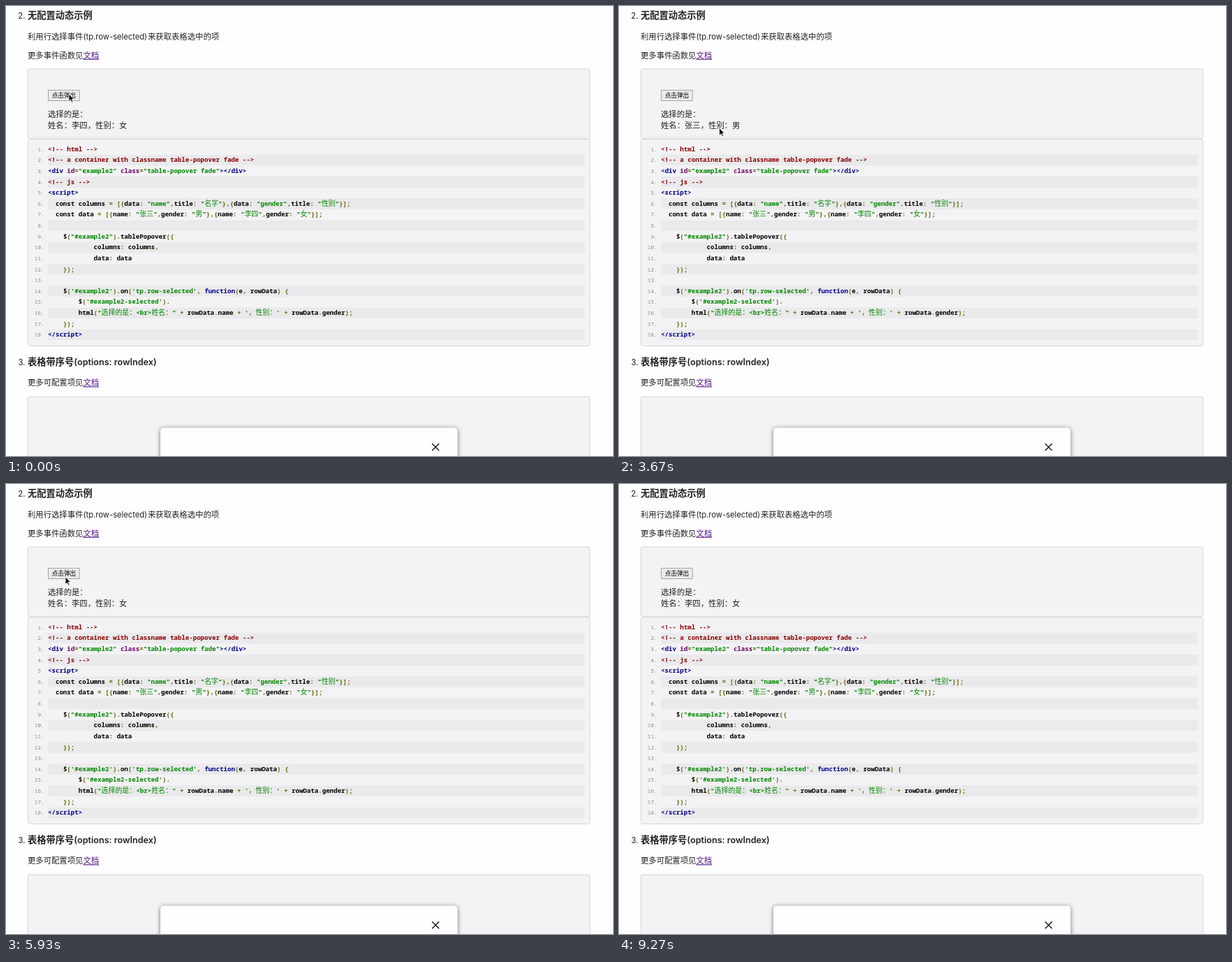
These frames come from a looping animation (869x644 px, 9.34 s). An HTML page:

```html
<!DOCTYPE html>
<html lang="zh-CN">
<head>
<meta charset="utf-8">
<title>Table popover</title>
<style>
html, body { margin: 0; width: 100%; height: 100%; overflow: hidden; background: #fefdff; }
svg { display: block; font: 11.35px Inter, "Noto Sans CJK SC", "Noto Sans CJK", sans-serif; fill: #222; }
text { white-space: pre; }
h, .title { font-size: 13.27px; font-weight: 600; }
.link { fill: #551a8b; text-decoration: underline; }
.panel { fill: #f3f2f4; stroke: #d6d5d8; }
.card { fill: #fefdff; filter: drop-shadow(0 1.5px 3px rgba(0, 0, 0, .55)); }
.close { stroke: #222; stroke-width: 1.6; }
.code { font: 600 9.12px "Noto Sans Mono", "Noto Sans CJK SC", "Noto Sans CJK", monospace; fill: #000; }
.cjk { font-size: 9.95px; font-weight: 500; }
.num { font-size: 7.6px; font-weight: 400; fill: #8a8a8a; text-anchor: end; }
.com { fill: #800; } .str { fill: #080; } .tag, .kwd { fill: #008; } .atn { fill: #606; } .pun { fill: #660; }
.cells { text-anchor: middle; font-size: 10px; }
.head { font-size: 11px; font-weight: 700; }
.cursor { stroke-width: .8; stroke-linejoin: round; }
</style>
</head>
<body>
<svg width="869" height="644" viewBox="0 0 869 644">
  <defs><path id="cross" class="close" d="M-5-5 5 5M5-5-5 5"/></defs>

  <text x="27.5" y="17.8" text-anchor="end">2.</text>
  <text x="31" y="18" class="title">无配置动态示例</text>
  <text y="47.5"><tspan x="31">利用行选择事件</tspan><tspan x="110.5" font-size="11.2">(tp.row-selected)</tspan><tspan x="203">来获取表格选中的项</tspan></text>
  <text x="31" y="74.7">更多事件函数见<tspan class="link">文档</tspan></text>

  <rect class="panel" x="31.5" y="90" width="804.5" height="100" rx="3"/>
  <rect id="button" x="60.5" y="120.5" width="44.7" height="15" stroke="#a5a4a6"/>
  <text x="65.7" y="131" font-size="8.6" fill="#000">点击弹出</text>
  <text x="60" y="159.2">选择的是：</text>
  <text x="60" y="174.7" id="chosen"></text>

  <rect class="panel" x="31.5" y="190.5" width="804.5" height="296" rx="3"/>
  <g class="code" id="code"></g>

  <text x="27.5" y="514.3" text-anchor="end">3.</text>
  <text x="31" y="514.3" class="title">表格带序号<tspan font-size="12.6">(options: rowIndex)</tspan></text>
  <text x="31" y="543.3">更多可配置项见<tspan class="link">文档</tspan></text>
  <rect class="panel" x="31.5" y="559" width="804.5" height="100" rx="3"/>
  <rect class="card" x="221" y="603.5" width="425.5" height="194" rx="5"/>
  <use href="#cross" x="615" y="631.3"/>

  <g id="modal">
    <rect class="card" x="207" y="223" width="425.5" height="194" rx="5"/>
    <use href="#cross" x="601" y="250.5"/>
    <path d="M217 270.5H621" stroke="#e2e1e4"/>
    <rect x="232" y="285.5" width="375.5" height="31" fill="#f3f5f8"/>
    <path d="M232 285.5H607.5" stroke="#9aa3a8"/>
    <path d="M232 316.5H607.5" stroke="#c3cacf"/>
    <path d="M232 346H607.5" stroke="#dcdbde"/>
    <g class="cells">
      <text class="head" x="326" y="305">名字</text><text class="head" x="513.5" y="305">性别</text>
      <text id="row0" x="326" y="334.8">张三</text><text x="513.5" y="334.8">男</text>
      <text id="row1" x="326" y="363.8">李四</text><text x="513.5" y="363.8">女</text>
    </g>
  </g>

  <g class="cursor" id="cursor">
    <path id="arrow" d="M0 0V10.5L2.4 8.3 4.1 12 5.8 11.2 4.2 7.7 7.3 7.5Z" fill="#000" stroke="#fff"/>
    <path id="hand" d="M-1 1Q0-.6 1 1V4.6Q2.2 3.6 3 4.8 4.2 4 5 5.2 6.8 4.8 7 6.4V9L6 12H.4L-3 8Q-3.2 6.4-1 7.4ZM1 4.6V7M3 4.8V7M5 5.2V7" fill="#fff" stroke="#000"/>
  </g>
</svg>
<script>
const $ = id => document.getElementById(id);

const source = `<\!-- html -->
<\!-- a container with classname table-popover fade -->
<div id="example2" class="table-popover fade"></div>
<\!-- js -->
<\script>
  const columns = [{data: "name",title: "名字"},{data: "gender",title: "性别"}];
  const data = [{name: "张三",gender: "男"},{name: "李四",gender: "女"}];

    $("#example2").tablePopover({
            columns: columns,
            data: data
    });

    $('#example2').on('tp.row-selected', function(e, rowData) {
        $('#example2-selected').
        html("选择的是：<br>姓名：" + rowData.name + '，性别：' + rowData.gender);
    });
<\/script>`;

const token = /(?<com><!--.*?-->)|(?<str>"[^"]*"|'[^']*')|(?<tag><\/?\w+|>)|(?<atn>\w+(?==))|(?<kwd>function)|(?<pun>[^\w\s$])|[\w$]+|\s+/g;
const escapeText = s => s.replace(/&/g, "&amp;").replace(/</g, "&lt;")
  .replace(/[\u3000-\uffef]+/g, run => `<tspan class="cjk">${run}</tspan>`);

function highlight(line) {
  return [...line.matchAll(token)].map(match => {
    const kind = Object.keys(match.groups).find(name => match.groups[name]);
    return `<tspan class="${kind || "pln"}">${escapeText(match[0])}</tspan>`;
  }).join("");
}

$("code").innerHTML = source.split("\n").map((line, i) => {
  const y = 207.7 + i * 15.62;
  const stripe = i % 2 ? `<rect x="60" y="${y - 10.5}" width="768.5" height="15.6" fill="#eae9eb"/>` : "";
  return `${stripe}<text class="num" x="54.5" y="${y}">${i + 1}.</text><text x="60" y="${y}">${highlight(line)}</text>`;
}).join("");

const LOOP = 9340, FADE = 150, STEP = 1000 / 15;
const visits = [[1750, 3250], [4150, 5250], [6400, 7500]]; // modal opens, closes
const track = [ // time, x, y of the pointer tip
  [0, 90, 126], [500, 90, 126], [1200, 79, 127], [1800, 79, 127],
  [2500, 330, 337], [3250, 330, 337], [3850, 90, 128], [4180, 90, 128],
  [4330, 100, 134], [4900, 328, 362], [5250, 328, 362], [5930, 85, 133],
  [6150, 83, 128], [6420, 83, 128], [6800, 501, 218], [7150, 599, 249],
  [7550, 599, 249], [8000, 590, 254], [8600, 330, 300]
];

const clamp = v => Math.max(0, Math.min(1, v));

function pointerAt(t) {
  const i = track.findIndex(key => key[0] > t);
  if (i < 0) return null;
  const [t0, x0, y0] = track[i - 1], [t1, x1, y1] = track[i];
  const p = (t - t0) / (t1 - t0), k = p * p * (3 - 2 * p);
  return [x0 + (x1 - x0) * k, y0 + (y1 - y0) * k];
}

function draw(t) {
  const opacity = Math.max(...visits.map(([open, close]) =>
    Math.min(clamp((t - open) / FADE), clamp(1 - (t - close) / FADE))));
  $("modal").setAttribute("opacity", opacity);

  const pressed = visits.some(([open]) => t >= open - 110 && t < open);
  $("button").setAttribute("fill", pressed ? "#b2b1b3" : "#ebeaec");
  $("chosen").textContent = t >= 3250 && t < 5250 ? "姓名：张三，性别：男" : "姓名：李四，性别：女";

  const tip = pointerAt(t);
  $("cursor").style.display = tip ? "" : "none";
  const [x, y] = tip || [0, 0];
  const over = (left, top, right, bottom) =>
    opacity > 0 && x > left && x < right && y > top && y < bottom;
  const rows = [over(314, 323, 338, 341), over(314, 352, 338, 370)];
  rows.forEach((hot, i) => $("row" + i).style.textDecoration = hot ? "underline" : "none");
  const pointing = rows[0] || rows[1] || over(593, 243, 609, 258);
  $("hand").style.display = pointing ? "" : "none";
  $("arrow").style.display = pointing ? "none" : "";
  $("cursor").setAttribute("transform", `translate(${x} ${y})`);
}

function tick() {
  const t = performance.now() % LOOP;
  draw(Math.floor((t + 4) / STEP) * STEP);
  requestAnimationFrame(tick);
}
tick();
</script>
</body>
</html>
```
